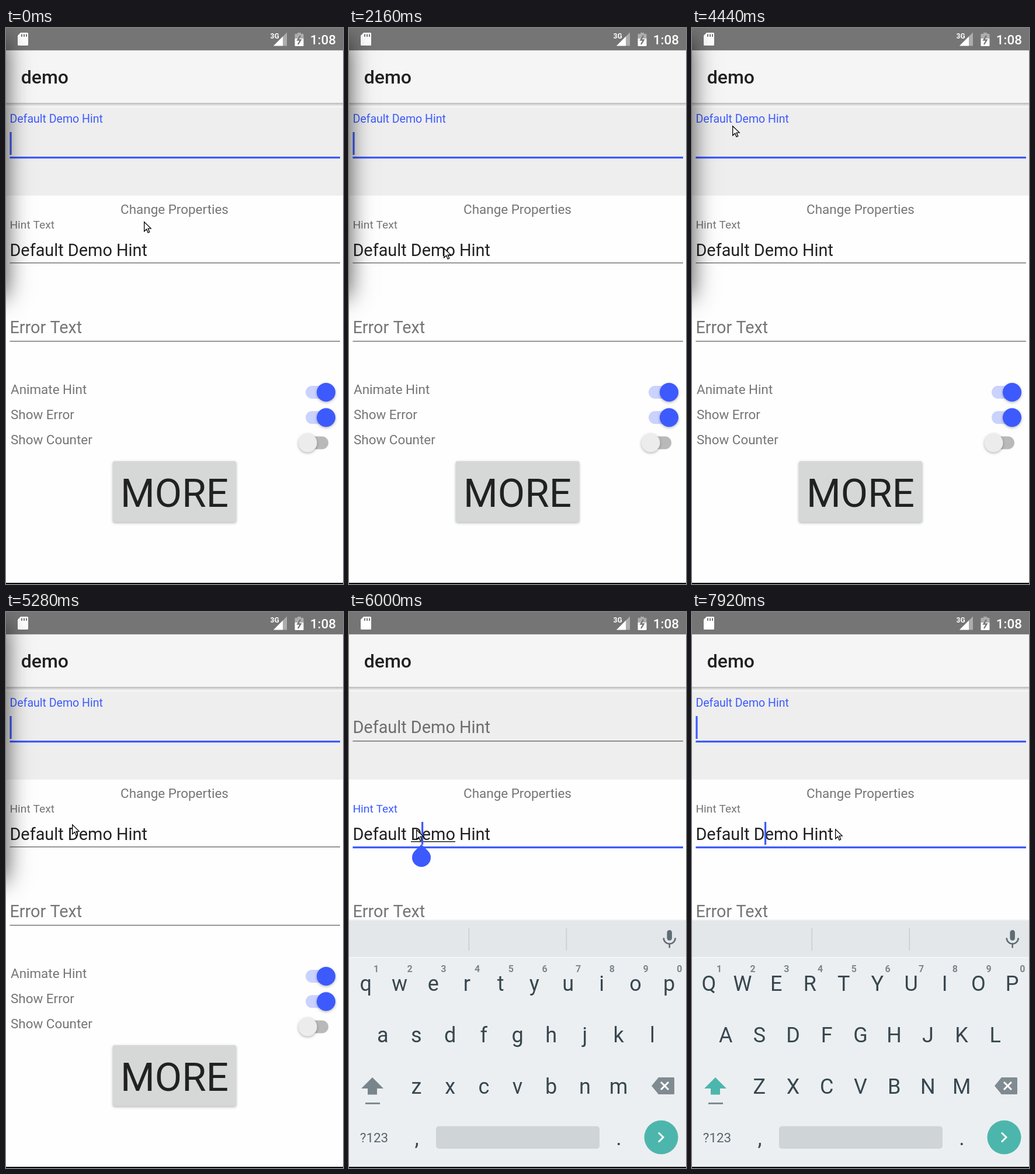
Recreate the animation shown at these times as an HTML page with a canvas. Size 577 px wide and 951 px high, loop 8 s.

```html
<!DOCTYPE html>
<html lang="en">
<head>
<meta charset="utf-8">
<title>Text field demo</title>
<style>
  html, body { margin: 0; width: 100%; height: 100%; overflow: hidden; background: #fff; }
  canvas { display: block; }
</style>
</head>
<body>
<canvas id="stage" width="577" height="951"></canvas>
<script>
const ctx = document.getElementById('stage').getContext('2d');
const WIDTH = 577, HEIGHT = 951, CENTER = WIDTH / 2;
const LOOP = 8000, STEP = 120;

// Android layout units: 360 dp fill the stage width
const DP = WIDTH / 360;
const MARGIN = 4 * DP, SMALL = 12 * DP, BODY = 14 * DP, INPUT = 18 * DP, TITLE = 20 * DP, HUGE = 42 * DP;
const FIELD_PITCH = 181;

const BLUE = '#3d5afe', STATUS = '#757575', STATUS_DIM = '#adadad';
const MUTED = 'rgba(0,0,0,.54)', DARK = '#212121';
const TEAL = '#4db6ac', KEY = '#37474f', KEY_ICON = '#7f8b90', MIC = '#5f6d74';

const FOCUS_LOWER = 5640, KEYBOARD_IN = 5800, FOCUS_UPPER = 6480, CAPS_ON = 6600, REFOCUS_LOWER = 7900;

// Pointer gestures: start, end, x, y to reach
const POINTER_START = [236, 331];
const GESTURES = [
  [0, 120, 242, 309], [240, 600, 271, 345], [600, 1080, 222, 377], [1080, 1920, 189, 378],
  [1920, 2160, 162, 376], [2160, 2760, 150, 185], [2760, 3240, 4, 130], [3240, 3960, 170, 180],
  [3960, 4440, 69, 167], [4440, 5400, 115, 372], [6120, 6360, 115, 200], [7080, 7920, 245, 371]
];

const progress = (t, start, end) => Math.max(0, Math.min(1, (t - start) / (end - start)));
const smooth = p => p * p * (3 - 2 * p);
const easeOut = p => 1 - (1 - p) ** 1.9;
const mix = (a, b, p) => a + (b - a) * p;
const blink = age => age % 1000 < 500;

function rect(x, y, w, h, color, radius = 0) {
  ctx.fillStyle = color;
  ctx.beginPath();
  ctx.roundRect(x, y, w, h, radius);
  ctx.fill();
}

function circle(x, y, r, color) {
  ctx.fillStyle = color;
  ctx.beginPath();
  ctx.arc(x, y, r, 0, 2 * Math.PI);
  ctx.fill();
}

function trace(points) {
  ctx.beginPath();
  points.forEach(([x, y]) => ctx.lineTo(x, y));
}

function polygon(points, color) {
  trace(points);
  ctx.closePath();
  ctx.fillStyle = color;
  ctx.fill();
}

function line(points, color, width) {
  trace(points);
  ctx.strokeStyle = color;
  ctx.lineWidth = width;
  ctx.stroke();
}

function text(str, x, y, size, color, align = 'left', weight = 400) {
  ctx.font = `${weight} ${size}px Roboto, sans-serif`;
  ctx.textAlign = align;
  ctx.fillStyle = color;
  ctx.fillText(str, x, y);
}

function withShadow(color, blur, dx, dy, draw) {
  ctx.save();
  ctx.shadowColor = color;
  ctx.shadowBlur = blur;
  ctx.shadowOffsetX = dx;
  ctx.shadowOffsetY = dy;
  draw();
  ctx.restore();
}

const raised = draw => withShadow('rgba(0,0,0,.3)', 4, 0, 1.5, draw);

function memoryCard() {
  rect(20, 8, 18, 22, '#fff', 1.5);
  polygon([[19, 7], [26, 7], [19, 14]], STATUS);
  for (let i = 0; i < 3; i++) rect(26 + 4 * i, 10.5, 2, 4.5, STATUS);
}

function signal(right, size, color) {
  polygon([[right, 30.5 - size], [right, 30.5], [458, 30.5]], color);
}

function battery() {
  rect(499, 8, 6, 4, STATUS_DIM);
  rect(494.5, 10, 15, 9, STATUS_DIM, 1);
  rect(494.5, 18, 15, 13, '#fff', 1);
  line([[504, 13], [499.5, 20.5], [504.5, 20.5], [500, 28]], STATUS, 2.4);
}

function statusBar() {
  rect(0, 0, WIDTH, 38.5, STATUS);
  memoryCard();
  text('3G', 452.5, 18, 12, '#fff', 'left', 700);
  signal(481, 23, STATUS_DIM);
  signal(474, 16, '#fff');
  battery();
  text('1:08', 565, 28, BODY, '#fff', 'right', 500);
}

function toolbar() {
  rect(0, 38.5, WIDTH, 97.5, '#f5f5f5');
  const shade = ctx.createLinearGradient(0, 128, 0, 134);
  shade.addColorStop(0, 'rgba(0,0,0,.25)');
  shade.addColorStop(1, 'rgba(0,0,0,0)');
  rect(0, 128, WIDTH, 6, shade);
  text('demo', 16 * DP, 95, TITLE, DARK, 'left', 500);
}

function underline(y, focused) {
  rect(MARGIN, y, WIDTH - MARGIN - 5, (focused ? 2 : 1) * DP, focused ? BLUE : MUTED);
}

function caret(x, y) {
  rect(x, y, 2 * DP, 39, BLUE);
}

function upperField(t) {
  const focused = t < FOCUS_LOWER || t >= FOCUS_UPPER;
  const drop = t < FOCUS_UPPER
    ? progress(t, FOCUS_LOWER, FOCUS_LOWER + 200)
    : 1 - progress(t, FOCUS_UPPER, FOCUS_UPPER + 200);
  rect(0, 136, WIDTH, 150.5, '#eee');
  text('Default Demo Hint', MARGIN, Math.round(mix(162, 207, easeOut(drop))),
    mix(19.55, INPUT, drop ** 2), focused ? BLUE : MUTED);
  underline(220, focused);
  const age = t < FOCUS_LOWER ? t + 200 : t - FOCUS_UPPER;
  if (focused && blink(age)) caret(MARGIN, 178);
}

function lowerField(t) {
  const active = t >= FOCUS_LOWER && t < FOCUS_UPPER;
  const refocused = t >= REFOCUS_LOWER;
  text('Change Properties', CENTER, 318, BODY, MUTED, 'center');
  text('Hint Text', MARGIN, 162 + FIELD_PITCH, SMALL, active ? BLUE : MUTED);
  text('Default Demo Hint', MARGIN, 390, INPUT, DARK);
  underline(220 + FIELD_PITCH, active || refocused);
  if (active && t >= 6000) rect(106, 392, 76, DP, DARK);
  if (refocused || active && blink(t - FOCUS_LOWER)) caret(124, 178 + FIELD_PITCH);
  if (active) dragHandle(124, 420, 16);
}

function dragHandle(x, y, r) {
  ctx.fillStyle = BLUE;
  ctx.beginPath();
  ctx.arc(x, y, r, -Math.PI / 4, -3 * Math.PI / 4);
  ctx.lineTo(x, y - r * Math.SQRT2);
  ctx.fill();
}

function toggle(label, y, on) {
  text(label, 8, Math.round(y + 2.5), BODY, MUTED);
  rect(on ? 513 : 505, y - 11, 47, 22, on ? '#cad2fe' : '#b9b9b9', 11);
  raised(() => circle(on ? 548 : 516.5, y, 10 * DP, on ? BLUE : '#ececec'));
}

function settings() {
  text('Error Text', MARGIN, 522, INPUT, MUTED);
  underline(535, false);
  ['Animate Hint', 'Show Error', 'Show Counter'].forEach((label, i) =>
    toggle(label, 623 + 27 * DP * i, i < 2));
  raised(() => rect(183, 741, 211, 104, '#d6d7d7', 3));
  text('MORE', CENTER, 819, HUGE, DARK, 'center');
}

function keyRow(letters, baseline) {
  [...letters].forEach((letter, i) => {
    const x = CENTER + (i - (letters.length - 1) / 2) * WIDTH / 10;
    text(letter, x, baseline, 36, KEY, 'center');
  });
}

function microphone(x) {
  rect(x - 4.25, 544, 8.5, 18, MIC, 4.25);
  ctx.beginPath();
  ctx.arc(x, 557.5, 10, 0, Math.PI);
  ctx.strokeStyle = MIC;
  ctx.lineWidth = 2.6;
  ctx.stroke();
  rect(x - 1.3, 567, 2.6, 7.5, MIC);
}

function shiftKey(caps) {
  const color = caps ? TEAL : '#78868c';
  polygon([[40, 796], [59, 815], [21, 815]], color);
  rect(32, 814, 16, 11.5, color);
  rect(28, 839, 25, 3, KEY_ICON);
}

function backspaceKey() {
  polygon([[518, 810.5], [530, 796], [530, 825]], KEY_ICON);
  rect(529, 796, 28, 29, KEY_ICON, 1.5);
  for (const slope of [-6.5, 6.5]) line([[534, 810.5 - slope], [547, 810.5 + slope]], '#fff', 3);
}

function enterKey(x, y) {
  circle(x, y, 29, TEAL);
  line([[x - 4.5, y - 8], [x + 3.5, y], [x - 4.5, y + 8]], '#fff', 3);
}

function keyboard(t) {
  const shown = t < FOCUS_LOWER ? 0 : progress(t, KEYBOARD_IN, KEYBOARD_IN + 200);
  if (!shown) return;
  const caps = t >= CAPS_ON;
  ctx.save();
  ctx.globalAlpha = shown;
  ctx.translate(0, 60 * (1 - shown));
  rect(0, 526, WIDTH, 2, '#eef0f1');
  rect(0, 528, WIDTH, 63, '#e3e7ea');
  rect(0, 591, WIDTH, 360, '#eceff1');
  rect(0, 590, WIDTH, 2, '#f3f5f6');
  for (const x of [204.5, 371.5]) rect(x, 541, DP, 38, '#c8cdd0');
  microphone(548.7);

  [...'1234567890'].forEach((digit, i) =>
    text(digit, 46.5 + i * WIDTH / 10, 616, 16, '#7b878d', 'center', 700));
  ['qwertyuiop', 'asdfghjkl', 'zxcvbnm'].forEach((row, i) =>
    keyRow(caps ? row.toUpperCase() : row, 648 + 88 * i));
  shiftKey(caps);
  backspaceKey();

  text('?123', 43, 907, BODY, '#56656c', 'center');
  text(',', 116, 912, 36, KEY, 'center');
  text('.', 462, 912, 36, KEY, 'center');
  rect(149, 879.5, 280, 38.5, '#cfd4d6', 5);
  enterKey(534.5, 898.5);
  ctx.restore();
}

// Soft shadow of a window standing just left of the stage
function edgeShadow() {
  withShadow('rgba(0,0,0,.7)', 38, WIDTH, 0, () => rect(-2 * WIDTH, 20, WIDTH, 440, '#000'));
}

function pointer(t) {
  const [x, y] = GESTURES.reduce((from, [start, end, ...to]) => {
    const p = smooth(progress(t, start, end));
    return from.map((v, axis) => mix(v, to[axis], p));
  }, POINTER_START);
  const arrow = [[0, 0], [0, 16], [4, 12.5], [6.5, 18.5], [9, 17.3], [6.5, 11.4], [11.4, 11.2]];
  ctx.save();
  ctx.translate(x + .7, y + .7);
  polygon(arrow, '#fff');
  ctx.strokeStyle = '#000';
  ctx.lineWidth = 1.3;
  ctx.stroke();
  ctx.restore();
}

function draw(now) {
  const t = Math.floor(now % LOOP / STEP) * STEP;
  rect(0, 0, WIDTH, HEIGHT, '#fefefe');
  statusBar();
  toolbar();
  upperField(t);
  lowerField(t);
  settings();
  if (t < FOCUS_LOWER) edgeShadow();
  keyboard(t);
  rect(0, HEIGHT - 2, WIDTH, 2, '#000');
  pointer(t);
}

const start = performance.now();
function tick() {
  draw(performance.now() - start);
  requestAnimationFrame(tick);
}
tick();
</script>
</body>
</html>
```
